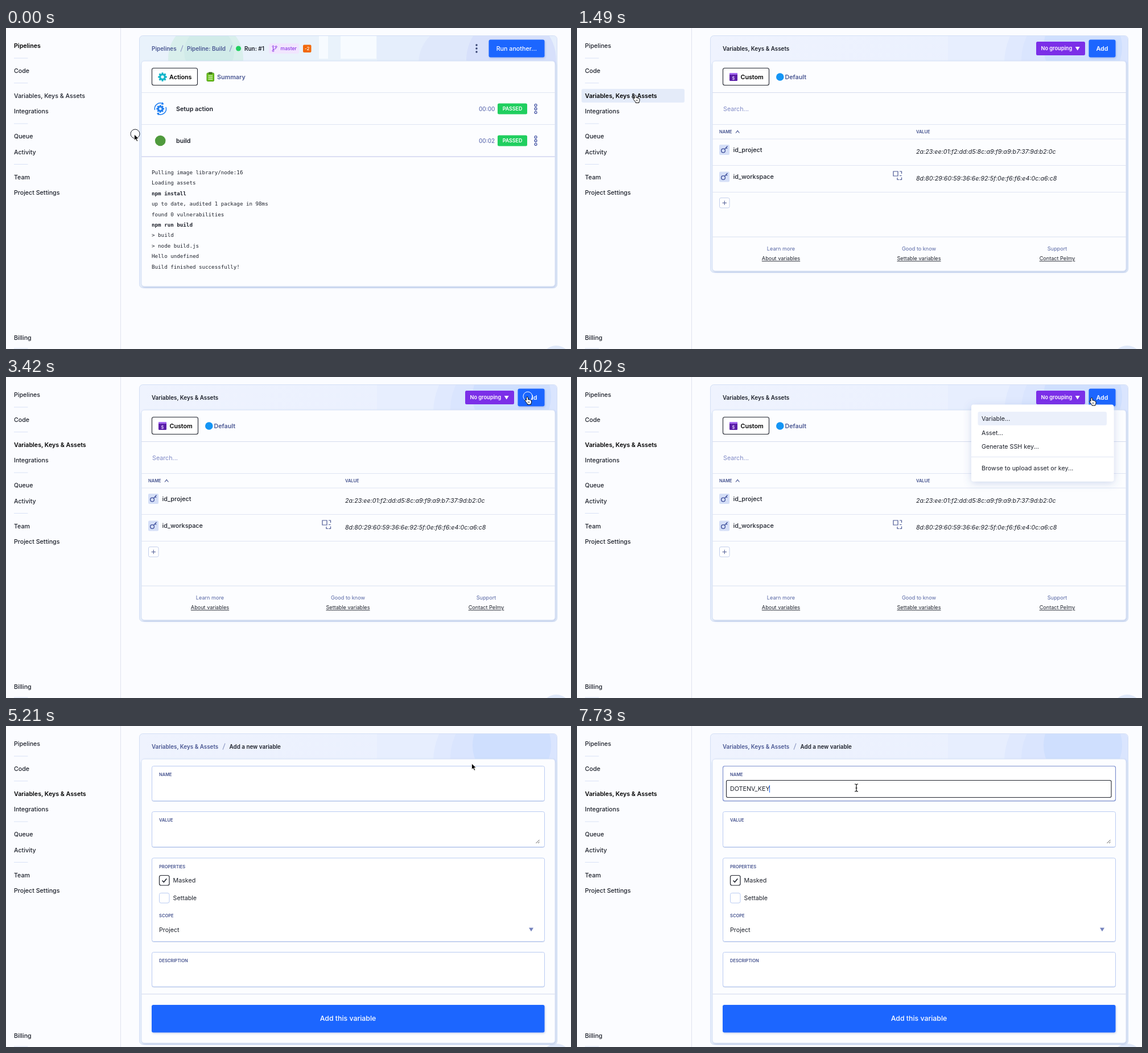
These frames come from a looping animation (993x564 px, 8 s). An HTML page:

```html
<!DOCTYPE html>
<html lang="en">
<head>
<meta charset="utf-8">
<title>Add a variable</title>
<style>
  html, body { margin: 0; width: 100%; height: 100%; overflow: hidden; background: #fbfcff; }
  svg { display: block; width: 993px; height: 564px; }
  text { font-family: Inter, "Liberation Sans", sans-serif; white-space: pre; }
  .mono { font-family: "DejaVu Sans Mono", monospace; }
  .off { display: none; }
  .link { text-decoration: underline; }
</style>
</head>
<body>
<svg id="stage" viewBox="0 0 993 564"></svg>
<script>
const LOOP = 8000;
const INK = '#1d212b', NAVY = '#4b5893', BLUE = '#1a66ff', EDGE = '#dfe5f3', FIELD = '#b9cbf2';

// Drawing helpers; text is placed by the middle of its capitals.
const text = (s, x, y, size = 10.72, fill = INK, weight = 400, more = '') =>
  `<text x="${x}" y="${y + size * .36}" font-size="${size}" fill="${fill}" font-weight="${weight}" ${more}>${s.replace(/&/g, '&amp;').replace(/>/g, '&gt;')}</text>`;
const mid = (s, x, y, size, fill, weight, more = '') =>
  text(s, x, y, size, fill, weight, 'text-anchor="middle" ' + more);
const box = (x, y, w, h, fill, r = 0, more = '') =>
  `<rect x="${x}" y="${y}" width="${w}" height="${h}" rx="${r}" fill="${fill}" ${more}/>`;
const dot = (x, y, r, fill, more = '') => `<circle cx="${x}" cy="${y}" r="${r}" fill="${fill}" ${more}/>`;
const path = (d, stroke, width = 1, fill = 'none', more = '') =>
  `<path d="${d}" fill="${fill}" stroke="${stroke}" stroke-width="${width}" ${more}/>`;
const line = (y, x1 = 238, x2 = 965, color = EDGE, w = 1) => path(`M${x1} ${y}H${x2}`, color, w);
const group = (id, s) => `<g id="${id}">${s}</g>`;
const at = (x, y, s) => `<g transform="translate(${x} ${y})">${s}</g>`;
const outline = (color, w = 1) => `stroke="${color}" stroke-width="${w}"`;

const gear = (x, y, r, color, hole) => {
  const teeth = Array.from({ length: 8 }, (_, i) =>
    box(-r * .24, -r * 1.18, r * .48, r * .5, color, .6, `transform="rotate(${i * 45})"`)).join('');
  return at(x, y, teeth + dot(0, 0, r * .9, color) + dot(0, 0, r * .42, hole));
};
const kebab = y => [-6.3, 0, 6.3].map(d => dot(931, y + d, 2, 'none', outline('#4656a5', 1.3))).join('');
const triangle = (x, y, fill) => `<path d="M${x - 4} ${y - 3}h8l-4 6.5z" fill="${fill}"/>`;
const tab = w => box(256.5, 70.5, w, 30, '#fff', 3, outline('#20242e', 1.1));

function panel(h, art) {
  return box(234.5, 13.5, 734, h, '#e9f0fb', 6, outline('#d3dff5')) +
    `<g clip-path="url(#head)">${art}</g>` +
    box(238, 58, 727, h - 47, '#fcfdff', 5, outline('#d9e3f6') + ' filter="url(#lift)"');
}

const blueArt = box(235, 14, 733, 50, 'url(#wash)') +
  box(652, 14, 316, 50, '#e7eefe') +
  dot(868, 62, 117, '#e0e9fe') + dot(878, 56, 97, '#dae5fe') + dot(889, 34, 69, '#cfdffe');
const runArt = box(235, 14, 733, 50, '#e9f2fb') +
  dot(351, 54, 66, '#d9efec') + dot(357, 42, 44, '#d1ebe9') +
  box(550, 14, 16, 40, '#f7fbff') + box(588, 14, 63, 40, '#f7fbff') +
  box(652, 14, 316, 50, '#e5eefc') + dot(792, 62, 67, '#dfe8fb') + dot(888, 56, 79, '#d7e0fb');

const slash = x => path(`M${x - 2} 41.5l4-11`, '#8e98c4', 1.1);

function runPage() {
  const log = ['Pulling image library/node:16', 'Loading assets', '*npm install',
    'up to date, audited 1 package in 98ms', 'found 0 vulnerabilities', '*npm run build',
    '> build', '> node build.js', 'Hello undefined', 'Build finished successfully!'];
  const row = (name, time, y) => text(name, 299, y, 10.72, INK, 600) +
    text(time, 831, y, 9.9, '#6673b4', 500) +
    box(864, y - 9.5, 52, 19, '#20cf5f', 2.5) + mid('PASSED', 890, y, 8.9, '#fff', 600) + kebab(y);
  return panel(443, runArt) +
    text('Pipelines', 256, 36, 9.95, NAVY, 600) + slash(309) +
    text('Pipeline: Build', 318, 36, 9.95, NAVY, 600) + slash(395) +
    dot(408.5, 36, 4.5, '#20cf5f') + text('Run: #1', 419, 36, 9.95, INK, 600) +
    box(462, 27, 53, 18, '#f1e5fe', 3) +
    path('M469.5 33.5v6M474.5 34v1q0 2-2.5 2t-2.5 2', '#8c35e6') +
    [[469.5, 32.5], [469.5, 40], [474.7, 33]].map(p => dot(...p, 1.4, '#f1e5fe', outline('#8c35e6'))).join('') +
    text('master', 482.5, 36, 8.6, '#8c35e6', 500) +
    box(522, 29.5, 14.5, 13.5, '#f2690d', 2) + mid('-2', 529.2, 36.2, 8, '#fff', 500) +
    [30, 36, 42].map(y => dot(827, y, 1.7, '#35416f')).join('') +
    box(848.5, 20.5, 98, 31, BLUE, 3, 'filter="url(#lift)"') + mid('Run another...', 897.3, 36, 10.72, '#fff', 500) +
    tab(80) + gear(275, 86, 6.6, '#12b5c9', '#e8fbff') + text('Actions', 287, 86, 10.72, '#000', 600) +
    box(353, 79, 12.5, 14.5, '#6cc220', 1.5, outline('#4b9a12')) + box(356, 77.5, 6.5, 3.5, '#3f6f20', 1) +
    path('M355.5 84h7.500M355.5 87h7.500M355.5 90h7.500', '#fff') +
    text('Summary', 371, 86, 10.72, NAVY, 600) +
    line(113.5) + line(169.5) + line(226, 238, 965, '#dcdff3', 2) +
    path('M261.500 144a10 10 0 0 1 14-11.200M281 139a10 10 0 0 1-14 12', '#1d7df0', 1.5) +
    path('M275 130l2.500 4-4.500 1zM267.500 153.500l-2.500-4 4.500-1z', 'none', 0, '#1d7df0') +
    gear(271.2, 142, 5.8, '#1d7df0', '#dcecff') +
    dot(271.2, 198, 9.3, '#4f9a3d') +
    row('Setup action', '00:00', 142) + row('build', '00:02', 198) +
    log.map((s, i) => text(s.replace('*', ''), 256, 253.8 + i * 18.38, 9.2, INK, s[0] === '*' ? 700 : 400, 'class="mono"')).join('');
}

function varsPage() {
  const key = y => box(250, y - 9, 18, 18, '#d5dff7', 2) +
    dot(257, y + 1.5, 3.4, 'none', outline('#3f4f9b', 1.3)) + path(`M259.500 ${y - 1}l5-5.500M262 ${y - 4}l2 2`, '#3f4f9b', 1.3);
  const row = (name, value, y) => key(y) + text(name, 274.5, y, 10.8, INK, 500) +
    text(value, 596, y + 2.8, 10.7, INK, 400, 'font-style="italic"');
  const foot = (a, b, x) => mid(a, x, 388, 9.15, '#5766a4', 400) + mid(b, x, 405, 9.15, INK, 400, 'class="link"');
  return panel(416, blueArt) +
    text('Variables, Keys & Assets', 256, 36, 9.85, INK, 600) +
    box(807, 24, 86, 24, '#7b2fe8', 2.5) + text('No grouping', 815.5, 36, 9.19, '#fff', 600) + triangle(879.7, 36, '#fff') +
    box(899.5, 20.5, 47, 31, BLUE, 3, 'filter="url(#lift)"') + mid('Add', 923, 36, 10.72, '#fff', 600) +
    tab(81) + box(268, 79, 14, 14, '#5b1fa8', 1.5) + box(268, 79, 14, 3, '#a56af0', 1) +
    mid('$', 275, 88, 7.5, '#e8d5ff', 600) + text('Custom', 287.5, 86, 10.72, '#000', 600) +
    dot(356.8, 86, 6.8, '#1495f5') + text('Default', 365.5, 86, 10.72, NAVY, 600) +
    line(113.5, 238, 965, '#d5dced') + text('Search...', 257, 142, 10.72, '#7f89c6') +
    line(169.5) + text('NAME', 250, 182.5, 7.5, '#414f8c', 600) + path('M279 184.500l3.200-4 3.200 4', '#414f8c', 1.1) +
    text('VALUE', 596, 182.5, 7.5, '#414f8c', 600) +
    line(195) + line(241.5) + line(288.5) + line(367, 238, 965, '#d8e0f0') +
    row('id_project', '2a:23:ee:01:f2:dd:d5:8c:a9:f9:a9:b7:37:9d:b2:0c', 214) +
    row('id_workspace', '8d:80:29:60:59:36:6e:92:5f:0e:f6:f6:e4:0c:a6:c8', 261.5) +
    path('M556 252h8v8h-8zM567 252h3.500v4M570.500 262.500v4h-3.500M566 266.500h-3v-3.500M567 259.500h3.500', '#4b5893', 1.2) +
    box(250.5, 298.5, 17.5, 17.5, '#fff', 2.5, outline('#c3cfec')) + path('M255.500 307.300h7.500M259.250 303.500v7.500', NAVY, 1) +
    foot('Learn more', 'About variables', 358.5) + foot('Good to know', 'Settable variables', 601) +
    foot('Support', 'Contact Pelmy', 844);
}

function menu() {
  return box(693, 48.5, 250.5, 135, '#fff', 4, 'filter="url(#deep)"') +
    box(704.5, 61, 226.5, 24, '#ebf0fb', 3) + line(140.5, 693, 943, EDGE) +
    [['Variable...', 73], ['Asset...', 97.7], ['Generate SSH key...', 122.2], ['Browse to upload asset or key...', 159.7]]
      .map(([s, y]) => text(s, 711, y)).join('');
}

function formPage() {
  const field = (label, y, h) =>
    box(256.5, y, 690, h, '#fff', 3, outline(FIELD) + ' filter="url(#soft)"') +
    text(label, 269, y + 15.2, 7.5, '#414f8c', 600);
  return panel(546, blueArt) +
    text('Variables, Keys & Assets', 256, 36, 9.85, NAVY, 600) + slash(383) +
    text('Add a new variable', 392.5, 36, 9.85, INK, 600) +
    field('NAME', 70.5, 61) + field('VALUE', 150.5, 62) + field('PROPERTIES', 232, 146.5) + field('DESCRIPTION', 397.5, 60.5) +
    path('M931.500 206l6-6M935 206l2.500-2.500', '#555', 1) +
    box(269.5, 262.5, 17.5, 17.5, '#fff', 3, outline('#20242e', 1.2)) + path('M274.500 271.500l2.800 2.800 5-6', '#20242e', 1.6) +
    box(269.5, 293.5, 17.5, 17.5, '#fff', 3, outline(FIELD)) +
    text('Masked', 293.5, 271.5) + text('Settable', 293.5, 302) +
    text('SCOPE', 269, 333, 7.5, '#414f8c', 600) + text('Project', 269, 358) + triangle(923, 357.5, '#7482bd') +
    line(471, 238, 965, '#dfe4f3', 1.5) +
    box(256, 490, 690.5, 48.5, BLUE, 3, 'filter="url(#lift)"') + mid('Add this variable', 601, 514, 12.3, '#fff', 500) +
    group('focus', box(256.5, 70.5, 690, 61, 'none', 3, outline('#7f90cf', 1.2))) +
    group('inner', box(262.5, 95.5, 676.5, 30, '#fff', 2.5, outline('#20242e', 1.1))) +
    text('', 269, 110.3, 10.72, INK, 400, 'id="typed"') +
    `<path id="caret" d="M0 104v13" stroke="${BLUE}"/>`;
}

const items = [['Pipelines', 31.5], ['Code', 75], ['Variables, Keys & Assets', 119], ['Integrations', 146.5],
  ['Queue', 190], ['Activity', 217.7], ['Team', 261.7], ['Project Settings', 289], ['Billing', 544.3]];
const sidebar = path('M201.500 0V564', '#dfe3ee') +
  [53, 96.7, 168, 239.5, 563].map(y => line(y, 14, 38.5, '#d9e2f5')).join('') +
  group('hover', box(8, 107, 181, 24, '#e4ebf9', 3)) +
  items.map(([s, y], i) => text(s, 14, y, 10.65, INK, 500, `id="item${i}"`)).join('');

const shadow = (id, dy, blur, alpha, dx = 0) =>
  `<filter id="${id}" x="-10%" y="-30%" width="120%" height="160%"><feDropShadow dx="${dx}" dy="${dy}" stdDeviation="${blur}" flood-color="#4468b8" flood-opacity="${alpha}"/></filter>`;

const stage = document.getElementById('stage');
stage.innerHTML = '<defs>' +
  shadow('lift', 1.5, 1.5, .3, 1) + shadow('soft', 1, .7, .25) + shadow('deep', 3, 7, .25) +
  '<clipPath id="head"><rect x="235" y="14" width="733" height="52" rx="6"/></clipPath>' +
  '<linearGradient id="wash"><stop offset="0" stop-color="#eff3fe"/><stop offset="1" stop-color="#e8effe"/></linearGradient></defs>' +
  box(0, 0, 993, 564, '#fbfcff') + sidebar + dot(967, 584, 26, '#dfe8f9') +
  group('run', runPage()) + group('vars', varsPage()) + group('menu', menu()) + group('form', formPage()) +
  dot(0, 0, 8, '#fff', 'id="ring"') +
  group('arrow', path('M0 0v10.500l2.500-2.300 1.800 4 1.900-.8-1.800-3.900h3.400z', '#fff', .8, '#000')) +
  group('hand', path('M-1.500 1.500q0-1.500 1.500-1.500t1.500 1.500v3q1.800-.6 2.200.5q1.800-.4 2.200.8q1.600-.2 1.600 1.400v2q0 1.500-1 2.600v1.600h-6v-1.200q-1.600-1.300-2.600-3.400l-1.800-2.400q-.3-1.600 1.200-1.400l1.200 1z', '#000', 1, '#fff') +
    path('M1.500 8v2.500M3.500 8v2.500', '#000', .7)) +
  group('beam', path('M-3-6q3 0 3 1.500q0-1.500 3-1.500M0-5v11M-3 7q3 0 3-1.500q0 1.500 3 1.500M-1.500 1h3', '#000', 1.1));

const el = id => document.getElementById(id);
const show = (id, on) => el(id).classList.toggle('off', !on);

// Pointer travel: first and last step, number of steps, start, bend, end.
const moves = [
  { t0: 150, t1: 900, n: 6, pts: [[225.5, 187], [165, 150], [102.5, 118]] },
  { t0: 1940, t1: 2980, n: 8, pts: [[102.5, 118], [430, 240], [916, 35]] },
  { t0: 4020, t1: 4610, n: 5, pts: [[916, 35], [860, 42], [818.5, 66]] },
  { t0: 5660, t1: 5950, n: 3, pts: [[818.5, 66], [640, 98], [491, 108]] }
];
const clicks = [[0, 227, 186], [1190, 103, 117], [3420, 917, 34], [5060, 819.5, 66], [6250, 491, 108]];
const word = 'DOTENV_KEY';

const steps = (t, t0, t1, n) =>
  t < t0 ? 0 : Math.min(n, Math.floor((t - t0) / ((t1 - t0) / (n - 1)) + 1e-6) + 1);
const ease = u => u * u * (3 - 2 * u);

function pointer(t) {
  const m = moves.filter(m => t >= m.t0).pop() || moves[0];
  const u = ease(steps(t, m.t0, m.t1, m.n) / m.n), v = 1 - u;
  return [0, 1].map(i => v * v * m.pts[0][i] + 2 * u * v * m.pts[1][i] + u * u * m.pts[2][i]);
}

function draw(t) {
  const page = t < 1340 ? 'run' : t < 5210 ? 'vars' : 'form';
  ['run', 'vars', 'form'].forEach(p => show(p, p === page));
  show('menu', t >= 3570 && t < 5210);

  const [x, y] = pointer(t);
  const overItem = x < 189 && y > 107 && y < 131;
  show('hover', overItem);
  items.forEach((_, i) => {
    const active = i === (page === 'run' ? 0 : 2);
    el('item' + i).setAttribute('font-weight', active ? 600 : 500);
    el('item' + i).setAttribute('fill', active ? '#000' : INK);
  });

  const inField = page === 'form' && y > 95;
  const onButton = page === 'vars' && (x > 900 || t >= 4020);
  const kind = inField ? 'beam' : overItem || onButton ? 'hand' : 'arrow';
  ['arrow', 'hand', 'beam'].forEach(k => show(k, k === kind));
  el(kind).setAttribute('transform', `translate(${x} ${y})`);

  const click = clicks.find(c => t >= c[0] && t < c[0] + 150);
  show('ring', click);
  if (click) {
    const onBlue = click[1] > 900, ring = el('ring');
    ring.setAttribute('cx', click[1]);
    ring.setAttribute('cy', click[2]);
    ring.setAttribute('fill', onBlue ? BLUE : 'rgba(255,255,255,.45)');
    ring.setAttribute('stroke', onBlue ? '#fff' : '#20242e');
  }

  show('inner', inField);
  show('focus', t >= 6250);
  show('caret', t >= 6400);
  const typed = el('typed');
  typed.textContent = word.slice(0, Math.round(steps(t, 6700, 7730, 8) * word.length / 8));
  const width = typed.textContent ? typed.getComputedTextLength() : 0;
  el('caret').setAttribute('transform', `translate(${Math.floor(269 + width) + .5} 0)`);
}

const start = performance.now();
function tick() {
  draw((performance.now() - start) % LOOP);
  requestAnimationFrame(tick);
}
tick();
</script>
</body>
</html>
```
